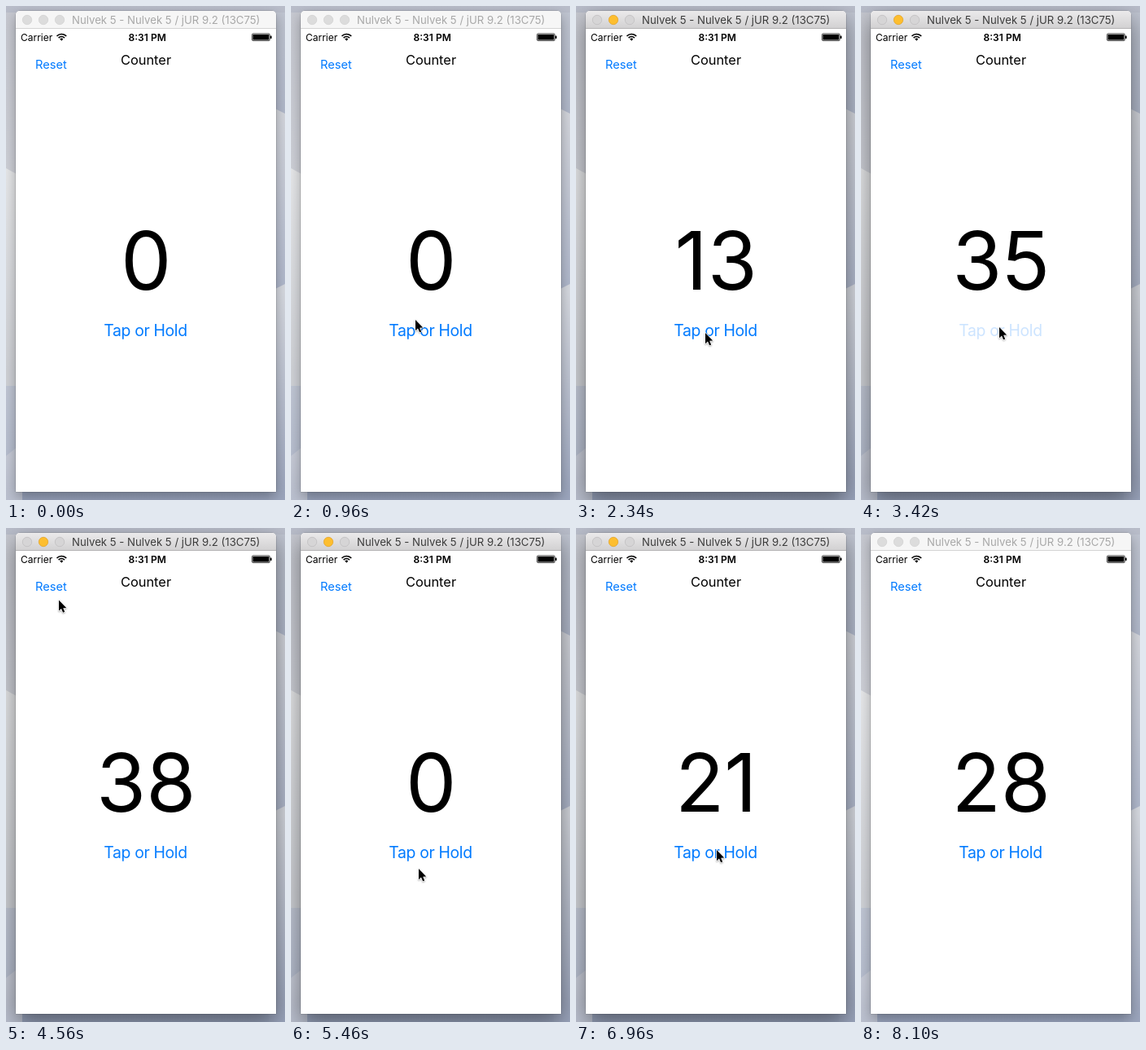
Write an HTML page with a canvas that moves like this. It is 343 px wide and 606 px high and loops after 8220 ms.

```html
<!DOCTYPE html>
<html lang="en">
<head>
<meta charset="utf-8">
<title>Counter</title>
<style>
  html, body { margin: 0; width: 100%; height: 100%; overflow: hidden; }
  canvas { display: block; }
</style>
</head>
<body>
<canvas id="stage" width="343" height="606"></canvas>
<script>
const ctx = document.getElementById('stage').getContext('2d');
const W = 343, H = 606, LOOP = 8220, STEP = 60;
const BLUE = '0, 122, 255';
const HOLD_RATE = 36.5;          // ms per count while holding
const RECOVERY = 470;            // ms for a released button to regain its colour

const holds = [
  { down: 1380, start: 1860, total: 35 },
  { down: 5760, start: 6175, total: 28 }
];
const taps = [0, 1, 2].map(i => ({ down: 3420 + 300 * i, up: 3540 + 300 * i }));
const reset = { down: 4800, up: 4980 };
const stalls = [[2880, 3120], [6960, 7140]];

// Pointer moves; each eases from wherever the last one ended
const entry = { x: 168, y: 0 };
const moves = [
  { from: 240, to: 540, x: 143, y: 308 },
  { from: 660, to: 960, x: 153, y: 385 },
  { from: 1080, to: 1380, x: 141, y: 401 },
  { from: 1860, to: 2340, x: 159, y: 401 },
  { from: 2340, to: 3240, x: 170, y: 394 },
  { from: 4200, to: 4680, x: 58, y: 68 },
  { from: 5100, to: 5460, x: 157, y: 418 },
  { from: 5520, to: 5700, x: 161, y: 396 },
  { from: 6360, to: 6960, x: 173, y: 395 },
  { from: 7320, to: 7500, x: 180, y: 38 }
];

const clamp = (v, lo = 0, hi = 1) => Math.min(hi, Math.max(lo, v));
const mix = (a, b, k) => a + (b - a) * k;
const easeOut = k => 1 - (1 - k) ** 2;
const smooth = k => k * k * (3 - 2 * k);

function countAt(t) {
  const hold = holds[t < reset.up ? 0 : 1];
  const held = clamp(Math.floor((t - hold.start) / HOLD_RATE), 0, hold.total);
  return held + taps.filter(tap => tap.up > hold.start && tap.up <= t && t < reset.up).length;
}

function buttonAlpha(presses, t) {
  const last = presses.filter(p => t >= p.down).sort((a, b) => a.down - b.down).pop();
  if (!last) return 1;
  return mix(0.2, 1, smooth(clamp((t - (last.up ?? last.start)) / RECOVERY)));
}

function pointerAt(t) {
  if (t < moves[0].from || t >= moves[moves.length - 1].to) return null;
  return moves.reduce((p, m) => {
    const k = easeOut(clamp((t - m.from) / (m.to - m.from)));
    return { x: mix(p.x, m.x, k), y: mix(p.y, m.y, k) };
  }, entry);
}

function text(str, x, y, size, color, { align = 'left', weight = 400, spacing = 0 } = {}) {
  ctx.font = `${weight} ${size}px Inter, sans-serif`;
  ctx.letterSpacing = spacing + 'px';
  ctx.textAlign = align;
  ctx.fillStyle = color;
  ctx.fillText(str, x, y);
}

function fade(y0, y1, top, bottom) {
  const g = ctx.createLinearGradient(0, y0, 0, y1);
  g.addColorStop(0, top);
  g.addColorStop(1, bottom);
  return g;
}

function disc(x, y, r, fill, stroke) {
  ctx.beginPath();
  ctx.arc(x, y, r, 0, 7);
  ctx.fillStyle = fill;
  ctx.fill();
  ctx.strokeStyle = stroke;
  ctx.lineWidth = 0.7;
  ctx.stroke();
}

// A snowy slope along one edge of the stage, melting into the haze below
function slope(x, y, drop, top, bottom) {
  ctx.beginPath();
  ctx.moveTo(x, y);
  ctx.lineTo(x + 20, y + drop);
  ctx.lineTo(x + 20, H);
  ctx.lineTo(x, H);
  ctx.fillStyle = fade(y, y + 250, top, bottom);
  ctx.fill();
}

function drawBackdrop() {
  ctx.fillStyle = fade(0, H, '#b9bdca', '#98a3bc');
  ctx.fillRect(0, 0, W, H);
  slope(0, 8, 0, '#c6c8d0', '#d0d2d9');
  slope(0, 199, 11, '#e6e7e9', '#cfd1d6');
  slope(0, 466, 0, '#c0c6d4', '#a3adc4');
  slope(0, 552, -16, '#c6cad6', '#8d98b2');
  slope(323, 8, 0, '#bfc4d0', '#a2acc5');
  slope(323, 122, 10, '#d6d8de', '#abb4ca');
  slope(323, 351, -10, '#d6d9e0', '#9ba5bd');
}

function windowPath() {
  ctx.beginPath();
  ctx.roundRect(12, 6, 320, 590, [5, 5, 0, 0]);
}

function drawWindow(active) {
  ctx.save();
  ctx.shadowColor = active ? 'rgba(0,0,0,.45)' : 'rgba(0,0,0,.3)';
  ctx.shadowBlur = active ? 28 : 16;
  ctx.shadowOffsetY = active ? 10 : 6;
  ctx.fillStyle = '#fff';
  windowPath();
  ctx.fill();
  ctx.restore();

  ctx.strokeStyle = 'rgba(0,0,0,.2)';
  ctx.lineWidth = 1;
  ctx.stroke();

  ctx.save();
  ctx.fillStyle = '#fff';
  ctx.fill();
  ctx.clip();
  ctx.fillStyle = active ? fade(6, 28, '#ebeaeb', '#d1d0d1') : '#f6f6f6';
  ctx.fillRect(12, 6, 320, 22);
  ctx.fillStyle = active ? '#b5b4b5' : '#d4d4d4';
  ctx.fillRect(12, 27, 320, 1);
  ctx.restore();

  const gray = active ? ['#d6d5d6', '#bdbcbd'] : ['#dcdcdc', '#d0d0d0'];
  const amber = active ? ['#fdbe2f', '#e0a023'] : gray;
  [gray, amber, gray].forEach((c, i) => disc(26 + 20 * i, 17, 5.7, ...c));
  text('Nulvek 5 - Nulvek 5 / jUR 9.2 (13C75)', 81, 22, 13.2, active ? '#3c3c3c' : '#a8a8a8');
}

function drawStatusBar() {
  text('Carrier', 18, 42.5, 12, '#000');
  text('8:31 PM', 173.7, 42.5, 12.1, '#000', { align: 'center', weight: 600 });

  const wedge = [-Math.PI * 0.76, -Math.PI * 0.24];
  ctx.strokeStyle = ctx.fillStyle = '#000';
  ctx.lineWidth = 1.7;
  [8, 5].forEach(r => {
    ctx.beginPath();
    ctx.arc(68.3, 42.5, r, ...wedge);
    ctx.stroke();
  });
  ctx.beginPath();
  ctx.moveTo(68.3, 42.8);
  ctx.arc(68.3, 42.5, 2.8, ...wedge);
  ctx.fill();

  ctx.lineWidth = 0.7;
  ctx.beginPath();
  ctx.roundRect(302.4, 33.9, 22, 8.7, 1.5);
  ctx.stroke();
  ctx.fillRect(303.4, 34.9, 20, 6.7);
  ctx.fillRect(325, 36.6, 1.6, 3.3);
}

function drawPointer({ x, y }) {
  const arrow = new Path2D('M0 0V13.2L3 10.5L5.1 15.3L7.2 14.4L5.2 9.8L9.2 9.5Z');
  ctx.save();
  ctx.translate(x, y);
  ctx.shadowColor = 'rgba(0,0,0,.35)';
  ctx.shadowBlur = 2;
  ctx.shadowOffsetY = 1;
  ctx.lineJoin = 'round';
  ctx.lineWidth = 1.5;
  ctx.strokeStyle = '#fff';
  ctx.stroke(arrow);
  ctx.shadowColor = 'transparent';
  ctx.fillStyle = '#000';
  ctx.fill(arrow);
  ctx.restore();
}

function draw(time) {
  let t = Math.floor((time % LOOP) / STEP) * STEP;
  const stall = stalls.find(([from, to]) => t > from && t < to);
  if (stall) t = stall[0];

  drawBackdrop();
  drawWindow(t >= 1140 && t < 8100);
  drawStatusBar();
  text('Reset', 36, 76.7, 14.7, `rgba(${BLUE}, ${buttonAlpha([reset], t)})`);
  text('Counter', 172, 72, 16.4, '#000', { align: 'center' });
  text(countAt(t), 172.3, 348, 99, '#000', { align: 'center' });
  text('Tap or Hold', 171.5, 405, 19.4, `rgba(${BLUE}, ${buttonAlpha([...holds, ...taps], t)})`,
    { align: 'center', spacing: -0.35 });

  const pointer = pointerAt(t);
  if (pointer) drawPointer(pointer);
}

const start = performance.now();
function tick() {
  draw(performance.now() - start);
  requestAnimationFrame(tick);
}
tick();
</script>
</body>
</html>
```
